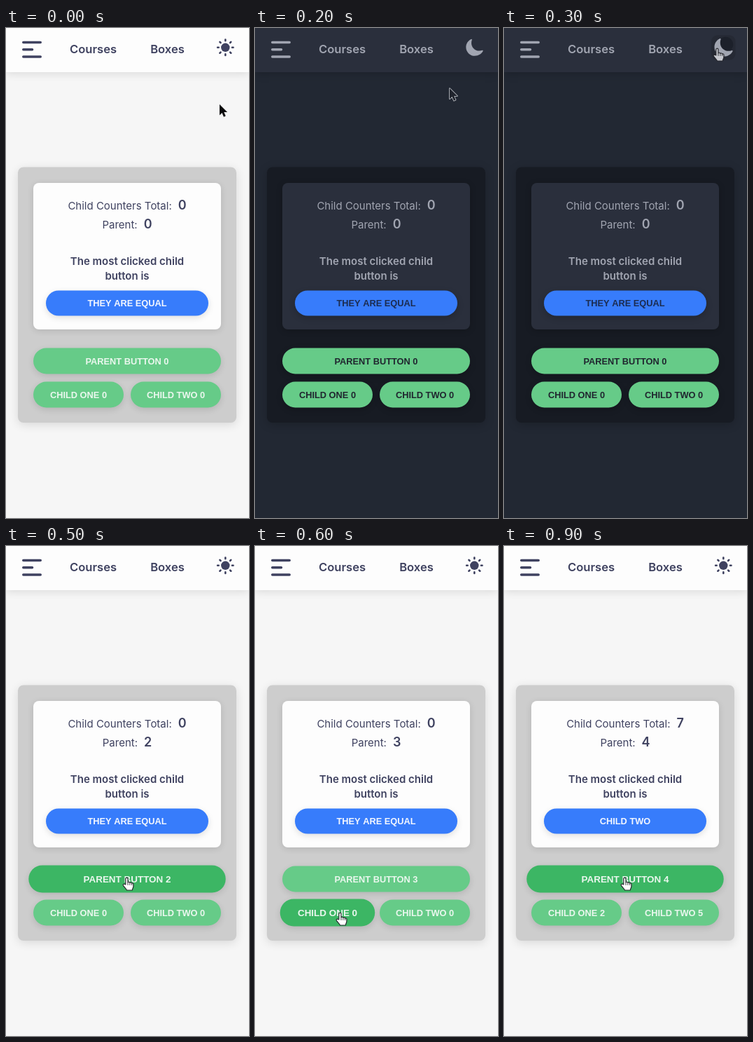
Write an HTML page with a canvas that moves like this. It is 347 by 699 pixels and loops after 1000 ms.

```html
<!DOCTYPE html>
<html lang="en">
<head>
<meta charset="utf-8">
<title>Click counters</title>
<style>
  html, body { margin: 0; width: 100%; height: 100%; overflow: hidden; background: #f6f6f6; }
  canvas { display: block; width: 347px; height: 699px; }
</style>
</head>
<body>
<canvas id="stage"></canvas>
<script>
const W = 347, H = 699, STEP = 100, LOOP = 1000;
const canvas = document.getElementById('stage');
const ctx = canvas.getContext('2d');
const dpr = window.devicePixelRatio || 1;
canvas.width = W * dpr;
canvas.height = H * dpr;

const UI = 'Inter, "Open Sans", sans-serif';
const BUTTON = '"Liberation Sans", Arial, sans-serif';

const LIGHT = {
  page: '#f6f6f6', surface: '#fdfdfd', panel: '#cdcdcd', text: '#3f4260',
  label: '#eaf7ee', blueLabel: '#f2f6ff', shadow: 'rgba(0,0,0,.12)'
};
const DARK = {
  page: '#222833', surface: '#2a2f3c', panel: '#171b23', text: '#a1a5b1',
  label: '#20262f', blueLabel: '#1c2c50', shadow: 'rgba(0,0,0,.2)'
};
const GREEN = '#66cb88', GREEN_HOVER = '#3cb664';
const BLUE = '#377cfb', BLUE_HOVER = '#2b70f8';

// Each entry holds for one step; counters carry over until changed.
const script = [
  { pointer: ['arrow', 305, 109] },
  { pointer: ['hand', 308.5, 34.5], hover: 'theme' },
  { pointer: ['arrow', 278, 86], dark: true },
  { pointer: ['hand', 304.5, 29.5], dark: true, hover: 'theme' },
  { pointer: ['arrow', 248.5, 374.5], hover: 'result' },
  { pointer: ['hand', 172.5, 473.5], hover: 'parent', parent: 2 },
  { pointer: ['hand', 121.5, 523.5], hover: 'one', parent: 3 },
  { pointer: ['hand', 242.5, 523.5], hover: 'two', one: 2 },
  { pointer: ['hand', 242.5, 523.5], hover: 'two', two: 5 },
  { pointer: ['hand', 172.5, 473.5], hover: 'parent', parent: 4 }
];
let counts = { parent: 0, one: 0, two: 0 };
const states = script.map(s => {
  const state = { ...counts, ...s };
  counts = { parent: state.parent, one: state.one, two: state.two };
  return state;
});

const MOON = new Path2D('M264 480A232 232 0 0 1 32 248C32 154 86 69.7 169.6 33.3a16 16 0 0 1 21 21C181 76.4 176 104.7 176 136c0 114.7 93.3 208 208 208 31.3 0 59.6-5 81.7-14.7a16 16 0 0 1 21 21C450.3 426 366 480 264 480z');
const HAND = new Path2D('M-1.7 9.5V1.2a1.6 1.6 0 0 1 3.2 0V6.3c.8-.9 2.4-.7 2.9.5c.9-.7 2.3-.4 2.7.7c1-.5 2.3.2 2.3 1.4v3c0 2-1.3 3-1.6 5.6H0c-1-2.4-3.5-4-5.2-7c-.6-1.4 1-2.4 2.1-1.5z');
const ARROW = new Path2D('M0 0V15.2L3.5 12L6 17.7L8.6 16.5L6.2 11H11z');

function box(x, y, w, h, r, fill, shadow, blur = 0, dy = 0) {
  ctx.save();
  if (shadow) {
    ctx.shadowColor = shadow;
    ctx.shadowBlur = blur * dpr;
    ctx.shadowOffsetY = dy * dpr;
  }
  ctx.fillStyle = fill;
  ctx.beginPath();
  ctx.roundRect(x, y, w, h, r);
  ctx.fill();
  ctx.restore();
}

function text(str, x, y, font, color, align = 'center') {
  ctx.font = font;
  ctx.fillStyle = color;
  ctx.textAlign = align;
  ctx.fillText(str, x, y);
}

function counterLine(label, n, y, color) {
  const small = `400 15px ${UI}`, big = `600 18px ${UI}`, gap = 9;
  ctx.font = small;
  const lw = ctx.measureText(label).width;
  ctx.font = big;
  const x = 173 - (lw + gap + ctx.measureText(n).width) / 2;
  text(label, x, y, small, color, 'left');
  text(n, x + lw + gap, y, big, color, 'left');
}

function pill(label, cx, cy, w, h, fill, color, shadow, scale = 1) {
  ctx.save();
  ctx.translate(cx, cy);
  ctx.scale(scale, scale);
  box(-w / 2, -h / 2, w, h, h / 2, fill, shadow, 10, 3);
  text(label, 0, 4.6, `bold 12.8px ${BUTTON}`, color);
  ctx.restore();
}

function sun(color) {
  ctx.fillStyle = ctx.strokeStyle = color;
  ctx.beginPath();
  ctx.arc(0, 0, 6.2, 0, Math.PI * 2);
  ctx.fill();
  ctx.lineWidth = 2.6;
  ctx.lineCap = 'round';
  ctx.beginPath();
  for (let i = 0; i < 8; i++) {
    const c = Math.cos(i * Math.PI / 4), s = Math.sin(i * Math.PI / 4);
    ctx.moveTo(c * 9.6, s * 9.6);
    ctx.lineTo(c * 11.2, s * 11.2);
  }
  ctx.stroke();
}

function moon(color, hovered) {
  if (hovered) {
    box(-16, -16.5, 32, 33, 8, '#252934');
    ctx.fillStyle = '#1c202a';
    ctx.beginPath();
    ctx.arc(3, -4, 10, 0, Math.PI * 2);
    ctx.fill();
  }
  ctx.scale(.0535, .0535);
  ctx.translate(-256, -256);
  ctx.fillStyle = color;
  ctx.fill(MOON);
}

function header(s, t) {
  box(0, 0, W, 63, 0, t.surface, t.shadow, 12, 2);
  ctx.strokeStyle = t.text;
  ctx.lineWidth = 3.6;
  ctx.lineCap = 'round';
  ctx.beginPath();
  [[20.5, 49.2], [30.8, 37.5], [41, 49.2]].forEach(([y, end]) => {
    ctx.moveTo(24.8, y);
    ctx.lineTo(end, y);
  });
  ctx.stroke();
  const font = `600 16.6px ${UI}`;
  text('Courses', 124.5, 36, font, t.text);
  text('Boxes', 230.5, 36, font, t.text);

  const hovered = s.hover === 'theme';
  ctx.save();
  ctx.translate(313.3, 27.8);
  if (hovered) ctx.scale(1.07, 1.07);
  if (s.dark) moon(t.text, hovered);
  else sun(t.text);
  ctx.restore();
}

function leader({ one, two }) {
  return one === two ? 'THEY ARE EQUAL' : one > two ? 'CHILD ONE' : 'CHILD TWO';
}

function panel(s, t) {
  box(17, 198.5, 312, 364.5, 8, t.panel, t.shadow, 14, 3);
  box(39, 221, 268, 209, 8, t.surface, t.shadow, 10, 2);

  counterLine('Child Counters Total:', s.one + s.two, 259, t.text);
  counterLine('Parent:', s.parent, 286, t.text);
  const bold = `600 15px ${UI}`;
  text('The most clicked child', 173, 337.5, bold, t.text);
  text('button is', 173, 358.5, bold, t.text);

  const onResult = s.hover === 'result';
  pill(leader(s), 173, 392.5, 232, 36, onResult ? BLUE_HOVER : BLUE,
    t.blueLabel, t.shadow, onResult ? 1.01 : 1);

  const green = (id, label, cx, cy, w) => {
    const on = s.hover === id;
    pill(`${label} ${s[id]}`, cx, cy, w, 37, on ? GREEN_HOVER : GREEN,
      t.label, t.shadow, on ? 1.05 : 1);
  };
  green('parent', 'PARENT BUTTON', 173, 475, 268);
  green('one', 'CHILD ONE', 103.5, 523, 129);
  green('two', 'CHILD TWO', 242.5, 523, 129);
}

function pointer([kind, x, y], dark) {
  ctx.save();
  ctx.translate(x, y);
  ctx.lineJoin = 'round';
  const hand = kind === 'hand';
  const shape = hand ? HAND : ARROW;
  ctx.lineWidth = hand ? 1.2 : 1.6;
  ctx.strokeStyle = hand ? '#25262c' : dark ? '#c4c7cd' : '#e9e9e9';
  ctx.fillStyle = hand ? (dark ? '#c6c8cf' : '#fff') : dark ? '#20242d' : '#08080a';
  if (hand) ctx.fill(shape);
  ctx.stroke(shape);
  if (!hand) ctx.fill(shape);
  if (hand) {
    ctx.lineWidth = .9;
    ctx.beginPath();
    [1.5, 4.4, 7.1].forEach(fx => {
      ctx.moveTo(fx, 7);
      ctx.lineTo(fx, 10);
    });
    ctx.stroke();
  }
  ctx.restore();
}

function draw(ms) {
  const s = states[Math.floor((ms % LOOP) / STEP)];
  const t = s.dark ? DARK : LIGHT;
  ctx.setTransform(dpr, 0, 0, dpr, 0, 0);
  ctx.fillStyle = t.page;
  ctx.fillRect(0, 0, W, H);
  header(s, t);
  panel(s, t);
  pointer(s.pointer, s.dark);
}

let start;
function tick(now) {
  start ??= now;
  draw(Math.max(0, now - start));
  requestAnimationFrame(tick);
}
draw(0);
requestAnimationFrame(tick);
</script>
</body>
</html>
```
